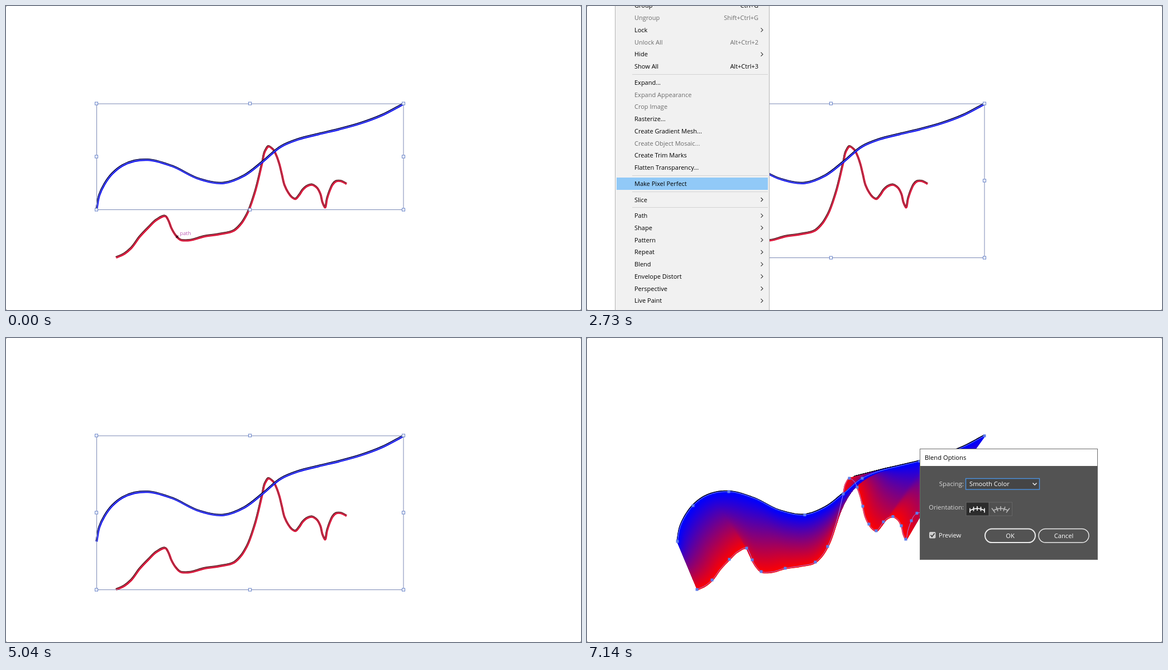
Recreate the animation shown at these times as an HTML page with a canvas. Size 1030 by 544 pixels, loop 8000 ms.

```html
<!DOCTYPE html>
<html lang="en">
<head>
<meta charset="utf-8">
<title>Blending two paths</title>
<style>
  html, body { margin: 0; width: 100%; height: 100%; overflow: hidden; background: #fff; }
  canvas { display: block; }
</style>
</head>
<body>
<canvas width="1030" height="544"></canvas>
<script>
const W = 1030, H = 544, LOOP = 8000;
const canvas = document.querySelector('canvas');
const ctx = canvas.getContext('2d');

// Points on each curve; every third (blue) or second (red) one is an anchor.
const bluePts = [[162,364],[167,338],[176,319],[190,300],[209,285],[230,277],[254,275],
  [297,286],[347,309.5],[390,316.5],[427,303],[460,278],[493,251],[523,238.5],[560,229],
  [596,220.5],[634,210],[674,195],[712,175]];
const redPts = [[197,450],[212,443],[224,433],[239,413],[255,396],[270,382],[286,376],
  [291,384],[296,397],[303,409],[312,418],[328,419],[355,412],[382,408],[409,401],
  [422,388],[431,373],[445,335],[459,279],[464,259],[470,251],[478,256],[484,267],
  [489,281],[494,301],[499,321],[505,333],[511,341],[518,345],[525,338],[531,329],
  [539,322],[548,319.5],[557,325],[563,336],[567,352],[571,360],[575,344],[581,327],
  [585,319],[591,313.5],[600,313],[610,318]];

// Smooth curve through the points, with tangents weighted by chord length.
function smooth(pts) {
  const chord = i => {
    const [a, b] = [pts[i], pts[i + 1]];
    if (!a || !b) return null;
    const len = Math.hypot(b[0] - a[0], b[1] - a[1]);
    return { len, dir: b.map((v, k) => (v - a[k]) / len) };
  };
  const tangent = i => {
    const p = chord(i - 1), n = chord(i);
    if (!p || !n) return (p || n).dir;
    return p.dir.map((v, k) => (v * n.len + n.dir[k] * p.len) / (p.len + n.len));
  };
  let d = 'M' + pts[0];
  for (let i = 0; i < pts.length - 1; i++) {
    const reach = chord(i).len / 3, m0 = tangent(i), m1 = tangent(i + 1);
    const c1 = pts[i].map((v, k) => v + m0[k] * reach);
    const c2 = pts[i + 1].map((v, k) => v - m1[k] * reach);
    d += `C${c1} ${c2} ${pts[i + 1]}`;
  }
  return d;
}
const blueD = smooth(bluePts), redD = smooth(redPts);
const blue = new Path2D(blueD), red = new Path2D(redD);

function sampler(d) {
  const p = document.createElementNS('http://www.w3.org/2000/svg', 'path');
  p.setAttribute('d', d);
  const len = p.getTotalLength();
  return f => p.getPointAtLength(f * len);
}

const mix = (a, b, t) => a + (b - a) * t;

// Piecewise linear lookup through [x, y] pairs.
function lookup(pairs, x) {
  for (let i = 1; i < pairs.length; i++) {
    const [x0, y0] = pairs[i - 1], [x1, y1] = pairs[i];
    if (x <= x1) return mix(y0, y1, (x - x0) / (x1 - x0));
  }
  return pairs[pairs.length - 1][1];
}

function line(g, path, color, width, dx = 0, dy = 0) {
  g.save();
  g.translate(dx, dy);
  g.strokeStyle = color;
  g.lineWidth = width;
  g.stroke(path);
  g.restore();
}

// The blend is a stack of in-between curves, red at the back, blue in front,
// over a dark copy shifted up that leaves a thin rim.
function makeBlend() {
  const layer = document.createElement('canvas');
  layer.width = W; layer.height = H;
  const g = layer.getContext('2d');
  const warp = [[0, 0], [.17, .17], [.383, .42], [.434, .5], [.576, .67],
    [.617, .715], [.7, .76], [1, 1]];
  const redAt = sampler(redD), blueAt = sampler(blueD);
  const n = 320, steps = 255, pairs = [], curves = [];
  for (let i = 0; i <= n; i++) pairs.push([redAt(i / n), blueAt(lookup(warp, i / n))]);
  for (let s = 0; s <= steps; s++) {
    const curve = new Path2D(), t = s / steps;
    for (const [p, q] of pairs) curve.lineTo(mix(p.x, q.x, t), mix(p.y, q.y, t));
    curves.push(curve);
  }
  g.lineJoin = 'round';
  curves.forEach((c, s) => line(g, c, `rgb(${255 - s},0,${s})`, 2.8, .2, .5));
  g.globalCompositeOperation = 'destination-over';
  curves.forEach((c, s) => { if (s > 40) line(g, c, '#000014', 2.4, -.5, -1); });
  return layer;
}
const blend = makeBlend();

function rect(x, y, w, h, fill, stroke, lw = 1) {
  if (fill) { ctx.fillStyle = fill; ctx.fillRect(x, y, w, h); }
  if (stroke) { ctx.strokeStyle = stroke; ctx.lineWidth = lw; ctx.strokeRect(x, y, w, h); }
}

function text(s, x, y, color = '#000', size = 11, align = 'left') {
  ctx.font = `${size}px "Open Sans", "Noto Sans", sans-serif`;
  ctx.textAlign = align;
  ctx.textBaseline = 'alphabetic';
  ctx.fillStyle = color;
  ctx.fillText(s, x, y + 4);
}

function poly(pts, color, width) {
  const p = new Path2D();
  pts.forEach(q => p.lineTo(...q));
  line(ctx, p, color, width);
}

// A stroke with a shaded upper edge and a pale selection line along its middle.
function shaded(path, base, shade, core) {
  line(ctx, path, base, 3.8, .2, .3);
  line(ctx, path, shade, 1.5, -.6, -1.2);
  line(ctx, path, core, 1);
}

function strokes() {
  shaded(red, '#dc0a30', '#5a2024', '#cc4a66');
  shaded(blue, '#0c0cec', '#000040', '#7f8cf4');
}

function bounds(bottom) {
  const left = 162, top = 174.5, right = 712;
  const xs = [left, 437, right], ys = [top, (top + bottom) / 2, bottom];
  rect(left + .5, top + .5, right - left - .5, bottom - top - .5, null, '#7a88b4');
  ys.forEach((y, j) => xs.forEach((x, i) => {
    if (i !== 1 || j !== 1) rect(x - 2.5, y - 2.5, 5, 5, '#fff', '#6480c8');
  }));
}

function hoverLabel(x, y, color) {
  text('path', x + 5, y - 7, color, 9.3);
  poly([[x - 2, y - 2], [x + 2, y + 2]], '#301020', 1.4);
  poly([[x - 2, y + 2], [x + 2, y - 2]], '#301020', 1.4);
}

// Menu entries: "label|shortcut"; ">" opens a submenu, "~" is disabled, "-" is a rule.
const objectMenu = ['Group|Ctrl+G', '~Ungroup|Shift+Ctrl+G', 'Lock|>', '~Unlock All|Alt+Ctrl+2',
  'Hide|>', 'Show All|Alt+Ctrl+3', '-', 'Expand...', '~Expand Appearance', '~Crop Image',
  'Rasterize...', 'Create Gradient Mesh...', '~Create Object Mosaic...', 'Create Trim Marks',
  'Flatten Transparency...', '-', 'Make Pixel Perfect', '-', 'Slice|>', '-', 'Path|>', 'Shape|>',
  'Pattern|>', 'Repeat|>', 'Blend|>', 'Envelope Distort|>', 'Perspective|>', 'Live Paint|>'];
const envelopeMenu = ['Make with Warp...|Alt+Shift+Ctrl+W', 'Make with Mesh...|Alt+Ctrl+M',
  'Make with Top Object|Alt+Ctrl+C', '~Release'];
const blendMenu = ['Make|Alt+Ctrl+B', 'Release|Alt+Shift+Ctrl+B', '-', 'Blend Options...', '-',
  '~Expand'];

function menu(items, x, right, top, firstY, hoverY) {
  const row = 21.75, gap = 6.95;
  rect(x + .5, top + .5, right - x - 1, H + 20 - top, '#f1f1f1', '#b4b4b4');
  let y = firstY;
  for (const item of items) {
    if (item === '-') {
      rect(x + 31, Math.round(y - row / 2 + gap / 2 - .5), right - x - 34, 1, '#d2d2d2');
      y += gap;
      continue;
    }
    if (Math.abs(y - hoverY) < row / 2)
      rect(x + 3, Math.round(y - 10.8), right - x - 6, 22, '#91c9f7');
    const off = item[0] === '~';
    const [label, key] = item.slice(off ? 1 : 0).split('|');
    const color = off ? '#6d6d6d' : '#000';
    text(label, x + 35, Math.round(y), color);
    if (key === '>') poly([[right - 15.5, y - 3.5], [right - 12, y], [right - 15.5, y + 3.5]], '#333', 1.1);
    else if (key) text(key, right - 20, Math.round(y), color, 11, 'right');
    y += row;
  }
}

const pointer = [[2450, 21], [2730, 318], [3150, 506]];
function menus(t) {
  const step = Math.floor(t / 70) * 70;
  const hover = t < 2450 ? -99 : t < 3220 ? lookup(pointer, step) : t < 3920 ? 484 : 462;
  menu(objectMenu, 50, 327, -20, -.6, hover);
  if (t >= 3640 && t < 4340) menu(envelopeMenu, 324, 620, 470, 484, -99);
  if (t >= 4410) menu(blendMenu, 324, 632, 448, 462, t >= 4620 ? 462 : -99);
}

function pill(x, label, width) {
  ctx.beginPath();
  ctx.roundRect(x, 341.5, 90, 24.5, 12.2);
  ctx.strokeStyle = '#ececec';
  ctx.lineWidth = width;
  ctx.stroke();
  text(label, x + 45, 354, '#fff', 11.2, 'center');
}

// Five ticks along an arc; upright, or fanned out to follow it.
function ticks(cx, color, fan) {
  const pts = [];
  for (let k = -2; k <= 2; k++) pts.push([cx + k * 6.5, 305 + k * k * .9]);
  poly(pts, color, 1.6);
  pts.forEach(([x, y], i) => {
    const lean = fan * (i - 2) * 1.5;
    poly([[x + lean, y - 4], [x - lean, y + 4]], color, 1.6);
  });
}

function dialog() {
  rect(597, 199, 318, 198, '#535353');
  rect(597, 199, 318, 30, '#fff');
  rect(596.5, 198.5, 318, 198, null, '#6a6a6a');
  text('Blend Options', 605, 214, '#000', 11.2);
  text('Spacing:', 675, 261, '#d6d6d6', 11.4, 'right');
  text('Orientation:', 675, 303, '#d6d6d6', 11.2, 'right');
  rect(678.5, 251.5, 132, 19.5, '#454545', '#4b92e0', 1.4);
  text('Smooth Color', 685, 261, '#fff', 11.2);
  poly([[798.5, 259.5], [802, 263], [805.5, 259.5]], '#f0f0f0', 1.5);
  rect(720, 294, 41.5, 24, '#505050', '#666');
  rect(679, 294, 41, 24, '#2c2c2c', '#686868');
  ticks(699, '#fff', 0);
  ticks(741, '#b8b8b8', 1);
  ctx.beginPath();
  ctx.roundRect(613, 347, 11.5, 11.5, 2);
  ctx.fillStyle = '#cfcfcf';
  ctx.fill();
  poly([[615.5, 352.5], [618, 355.5], [622.5, 349.5]], '#333', 1.6);
  text('Preview', 630, 353, '#fff', 11.2);
  pill(713, 'OK', 2);
  pill(809, 'Cancel', 1.4);
}

function blended(t) {
  ctx.drawImage(blend, 0, 0);
  line(ctx, red, '#a890ff', .9);
  line(ctx, blue, '#7f9cff', .9);
  if (t < 6790) return bounds(450.5);
  const anchor = ([x, y]) => rect(x - 2.5, y - 2.5, 5, 5, '#5f7cea');
  redPts.filter((p, i) => i % 2 === 0).forEach(anchor);
  bluePts.filter((p, i) => i % 3 === 0).forEach(anchor);
  ctx.globalAlpha = Math.max(0, Math.min(1, (t - 6790) / 210));
  if (t >= 6860) dialog();
  ctx.globalAlpha = 1;
}

function draw(t) {
  rect(0, 0, W, H, '#555');
  ctx.beginPath();
  ctx.roundRect(0, 0, W, H, 2);
  ctx.fillStyle = '#fff';
  ctx.fill();
  if (t >= 5110) return blended(t);
  strokes();
  bounds(t < 1400 ? 364.5 : 450.5);
  if (t < 70) hoverLabel(306.5, 413, '#bd5cb5');
  else if (t < 1610) hoverLabel(309.5, 416, '#d030cc');
  if (t >= 2380 && t < 5040) menus(t);
}

const start = performance.now();
function tick() {
  draw((performance.now() - start) % LOOP);
  requestAnimationFrame(tick);
}
tick();
</script>
</body>
</html>
```
